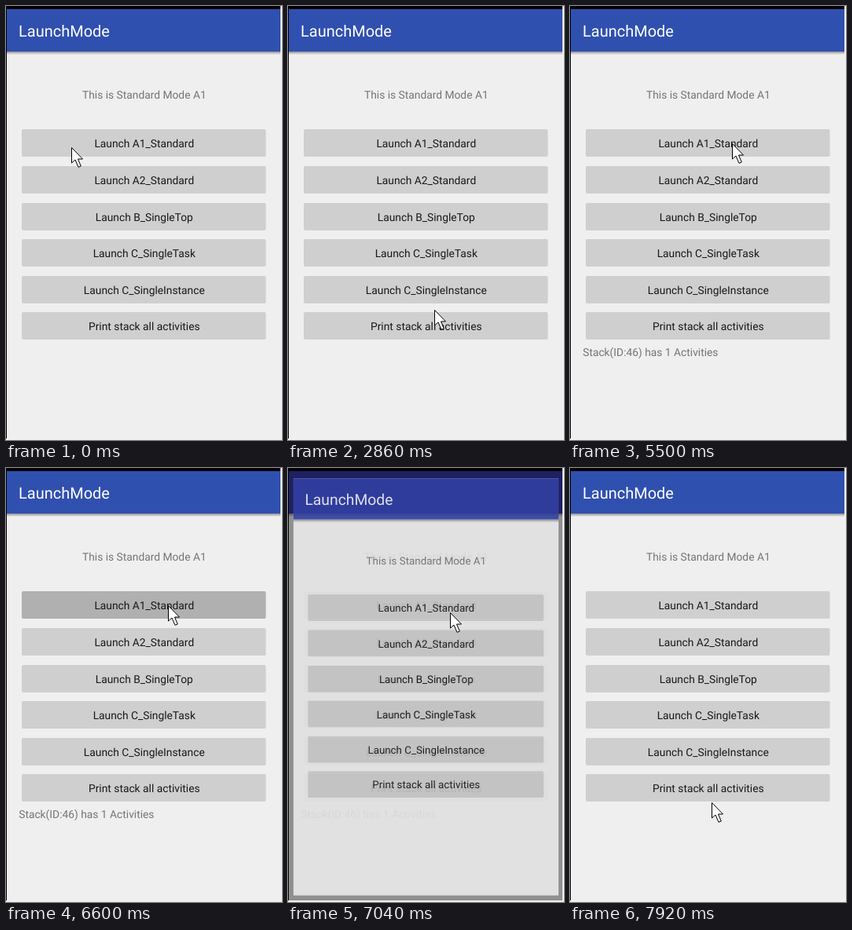
An HTML page for the animation above (8000 ms loop, 351 px wide and 553 px high).

```html
<!DOCTYPE html>
<html lang="en">
<head>
<meta charset="utf-8">
<title>Launch modes</title>
<style>
  html, body { margin: 0; width: 100%; height: 100%; overflow: hidden; background: #f0f0f0; }
  svg { display: block; width: 351px; height: 553px; }
  text { font: 13.8px Roboto, sans-serif; text-rendering: geometricPrecision; white-space: pre; }
  .title { font-size: 20px; fill: #fff; }
  .note { fill: #747474; }
  .label { fill: #181818; text-anchor: middle; }
</style>
</head>
<body>
<svg viewBox="0 0 351 553">
  <defs>
    <linearGradient id="shade" x2="0" y2="1">
      <stop offset="0" stop-opacity=".4"/>
      <stop offset="1" stop-opacity="0"/>
    </linearGradient>
    <clipPath id="device"><rect x="1" y="4" width="348" height="547"/></clipPath>
  </defs>
  <rect width="351" height="553" fill="#f0f0f0"/>
  <path d="M0 0H349V4H1V551H0Z"/>
  <g clip-path="url(#device)">
    <g id="current"></g>
    <g id="dim">
      <rect width="351" height="553" opacity=".4"/>
      <rect width="351" height="58" fill="#201f62" opacity=".9"/>
    </g>
    <g id="opening" opacity=".86"
       transform="translate(175.5 279) scale(.966) translate(-175.5 -279)"></g>
  </g>
  <path id="cursor" d="M.5 .5V20L5 16L9 25.3L12.3 24L8.5 15H14.5Z" fill="#fff" stroke="#000"/>
</svg>
<script>
const LOOP = 8000, STEP = 220;
const PRINTED = 16, PRESS = 30, RELEASE = 31, OPENING = 32, OPENED = 33;
const BUTTONS = ['Launch A1_Standard', 'Launch A2_Standard', 'Launch B_SingleTop',
  'Launch C_SingleTask', 'Launch C_SingleInstance', 'Print stack all activities'];

// Places where the pointer rests or turns; it eases from one to the next.
const STOPS = [
  { at: 0, x: 83, y: 180 },
  { at: 6, x: 161, y: 180 },
  { at: 8.3, x: 166, y: 178 },
  { at: 14.3, x: 188, y: 413 },
  { at: 15.5, x: 193, y: 413 },
  { at: 23.5, x: 206, y: 175 },
  { at: 31.5, x: 206, y: 175 },
  { at: 34, x: 207, y: 273 },
  { at: 36, x: 180, y: 426 }
];

const $ = id => document.getElementById(id);
const ease = p => (1 - Math.cos(Math.PI * p)) / 2;

function button(label, i) {
  const y = Math.round(157.4 + i * 46.6);
  return `<rect class="face" x="20" y="${y}" width="310.5" height="35" rx="2" fill="#cfcfcf"/>
    <text class="label" x="175.8" y="${y + 23}">${label}</text>`;
}

const screen = (header, note) => `
  <rect x="1" y="4" width="349" height="550" fill="#efefef"/>
  <rect x="1" y="58" width="349" height="4" fill="url(#shade)"/>
  <rect x="1" y="4" width="349" height="54" fill="${header}"/>
  <text class="title" x="16" y="39">LaunchMode</text>
  <text class="note" x="175.8" y="118" text-anchor="middle">This is Standard Mode A1</text>
  ${BUTTONS.map(button).join('')}
  <text class="note stack" x="16.2" y="446">${note}</text>`;

function pointerAt(step) {
  const next = Math.max(1, STOPS.findIndex(stop => stop.at >= step));
  const from = STOPS[next - 1], to = STOPS[next];
  const k = ease((step - from.at) / (to.at - from.at));
  return ['x', 'y'].map(axis => Math.round(from[axis] + (to[axis] - from[axis]) * k));
}

$('current').innerHTML = screen('#3050b0', 'Stack(ID:46) has 1 Activities');
$('opening').innerHTML = screen('#3241a6', '');
const stack = $('current').querySelector('.stack');
const firstFace = $('current').querySelector('.face');
const show = (el, on) => { el.style.display = on ? '' : 'none'; };

function draw(time) {
  const step = Math.floor(time % LOOP / STEP);
  $('cursor').setAttribute('transform', `translate(${pointerAt(step)})`);
  show(stack, step >= PRINTED && step < OPENED);
  show($('dim'), step === OPENING);
  show($('opening'), step === OPENING);
  firstFace.setAttribute('fill', step === PRESS ? '#b0b0b0' : step === RELEASE ? '#b8b8b8' : '#cfcfcf');
}

const start = performance.now();
(function tick() {
  draw(performance.now() - start);
  requestAnimationFrame(tick);
})();
</script>
</body>
</html>
```
